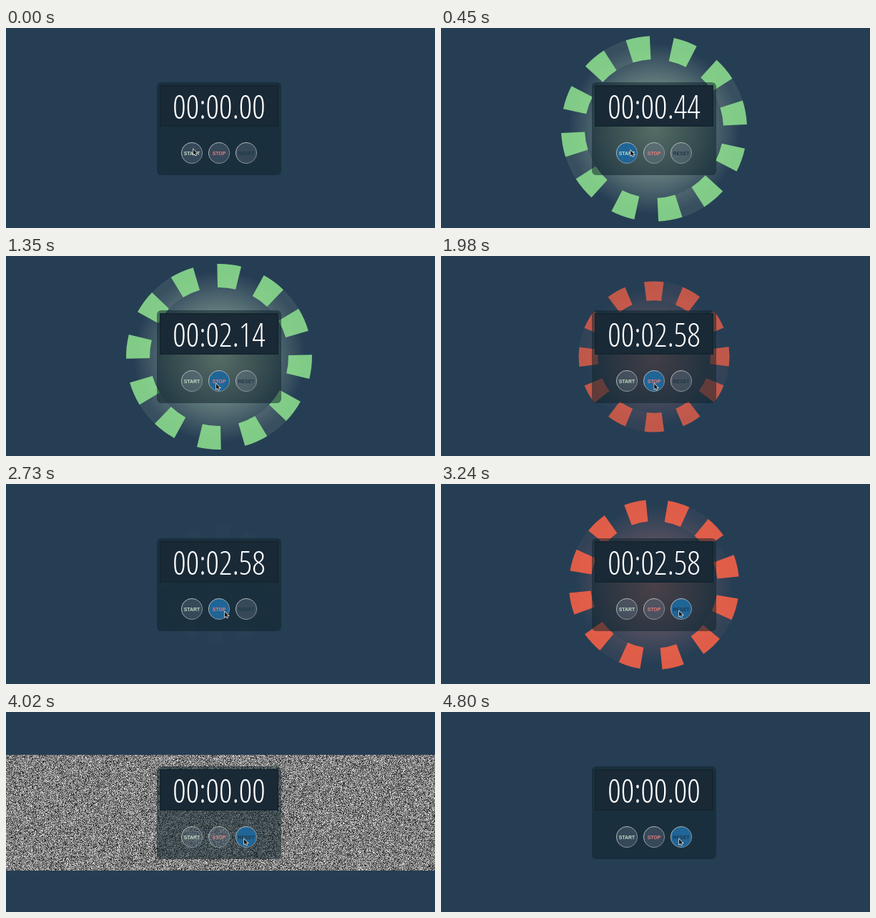
An HTML page with a canvas that plays this animation: 600x280 px, repeating every 4.83 s.

```html
<!DOCTYPE html>
<html lang="en">
<head>
<meta charset="utf-8">
<title>Stopwatch</title>
<style>
  html, body { margin: 0; height: 100%; overflow: hidden; background: #263e54; }
  canvas { display: block; }
</style>
</head>
<body>
<canvas id="stage" width="600" height="280"></canvas>
<script>
const ctx = document.getElementById('stage').getContext('2d');
const LOOP = 4830, STEP = 30, SECOND = 529.4; // one stopwatch second in ms of playback
const START = 217, STOP = 1583, RED = 1669, RESET = 3800;
const CX = 298, CY = 141, TAU = Math.PI * 2;

const pointerPath = [
  [0, 262, 170], [350, 262, 170], [780, 286, 181], [1350, 294, 179], [1700, 294, 179],
  [2400, 306, 179], [2730, 306, 179], [3200, 333, 178], [LOOP, 333, 178]
];
const buttons = [
  { label: 'START', x: 260, color: '#c0dcc2' },
  { label: 'STOP', x: 298, color: '#e67d7c' },
  { label: 'RESET', x: 336, color: '#1f3846' }
];
const pointerShape = new Path2D('M0 0V7.2L1.8 5.7L3 8.3L4.2 7.8L3 5.2H5.2Z');

const noise = document.createElement('canvas');
noise.width = 600;
noise.height = 210;
const noiseCtx = noise.getContext('2d');
const noiseData = noiseCtx.createImageData(600, 210);
const noisePixels = new Uint32Array(noiseData.data.buffer);

function pointerAt(t) {
  const i = pointerPath.findIndex(p => p[0] > t);
  const [t0, x0, y0] = pointerPath[i - 1], [t1, x1, y1] = pointerPath[i];
  const p = (t - t0) / (t1 - t0), k = p * p * (3 - 2 * p);
  return [x0 + (x1 - x0) * k, y0 + (y1 - y0) * k];
}

function drawWheel(t, scale, alpha, color, glow) {
  ctx.save();
  ctx.translate(CX, CY);
  ctx.rotate((t - START) / SECOND / 8 * TAU);
  ctx.scale(scale, scale);
  ctx.globalAlpha = alpha;
  const light = ctx.createRadialGradient(0, 0, 0, 0, 0, 120);
  light.addColorStop(0, `rgba(${glow},.8)`);
  light.addColorStop(1, `rgba(${glow},0)`);
  ctx.fillStyle = light;
  ctx.beginPath();
  ctx.arc(0, 0, 120, 0, TAU);
  ctx.fill();
  ctx.lineWidth = 33;
  const block = (angle, style) => {
    ctx.strokeStyle = style;
    ctx.beginPath();
    ctx.arc(0, 0, 113.5, angle - TAU / 48, angle + TAU / 48);
    ctx.stroke();
  };
  for (let i = 0; i < 12; i++) block(i * TAU / 12, color);
  for (let i = 0; i < 4; i++) block((i + .5) * TAU / 4, `rgba(${glow},.1)`);
  ctx.restore();
}

function drawNoise(t) {
  const half = 104 * (LOOP - STEP - t) / (LOOP - STEP - RESET);
  if (half <= 0) return;
  let seed = t * 7919 + 1;
  for (let i = 0; i < noisePixels.length; i++) {
    seed = (Math.imul(seed, 1664525) + 1013904223) >>> 0;
    const grey = ((seed >>> 24) + (seed >>> 16 & 255)) >> 1;
    noisePixels[i] = 0xff000000 | grey * 0x010101;
  }
  noiseCtx.putImageData(noiseData, 0, 0);
  const height = Math.round(half * 2);
  ctx.drawImage(noise, 0, 0, 600, height, 0, Math.round(CY - half), 600, height);
}

function drawPanel(time) {
  ctx.fillStyle = 'rgba(15,35,42,.53)';
  ctx.beginPath();
  ctx.roundRect(211, 76, 174, 130, 6);
  ctx.fill();
  ctx.fillStyle = '#1a2936';
  ctx.fillRect(215, 80, 166, 58);
  ctx.strokeStyle = '#14262f';
  ctx.lineWidth = 2;
  ctx.strokeRect(216, 81, 164, 56);

  ctx.fillStyle = '#fff';
  ctx.textAlign = 'center';
  ctx.font = '300 condensed 46px "Open Sans Condensed Light", "Open Sans", sans-serif';
  ctx.fillText('00:' + time.toFixed(2).padStart(5, '0'), CX, 126.5);
}

function drawButton({ label, x, color }, hovered) {
  const rim = ctx.createLinearGradient(x - 11, 164, x + 11, 186);
  rim.addColorStop(0, '#b9bebd');
  rim.addColorStop(1, '#7b858b');
  ctx.fillStyle = hovered ? '#206597' : 'rgba(130,145,165,.28)';
  ctx.strokeStyle = rim;
  ctx.lineWidth = 1;
  ctx.beginPath();
  ctx.arc(x, 175, 14.6, 0, TAU);
  ctx.fill();
  ctx.stroke();
  ctx.fillStyle = color;
  ctx.font = 'bold 6.9px "Liberation Sans", Arial, sans-serif';
  ctx.fillText(label, x, 177.5);
}

function drawPointer(x, y) {
  ctx.save();
  ctx.translate(x, y);
  ctx.fillStyle = '#111';
  ctx.strokeStyle = '#e8e8e8';
  ctx.lineWidth = 1.4;
  ctx.stroke(pointerShape);
  ctx.fill(pointerShape);
  ctx.restore();
}

function draw(t) {
  ctx.fillStyle = '#263e54';
  ctx.fillRect(0, 0, 600, 280);

  if (t >= START && t < 1650) {
    drawWheel(t, 1, Math.min(1, (t - START) / 150), 'rgba(144,226,144,.86)', '200,225,190');
  } else if (t >= RED && t < RESET) {
    const p = (t - RED) / (2 * SECOND) % 1;
    const fade = Math.sin(Math.PI * p) ** .8;
    drawWheel(t, .65 + .55 * p, fade, 'rgba(255,99,71,.85)', '170,110,115');
  }
  if (t >= RESET) drawNoise(t);

  const running = Math.max(0, Math.min(2.58, (t - START) / SECOND));
  drawPanel(t < STOP ? running : t < RESET ? 2.58 : 0);

  const [px, py] = pointerAt(t);
  for (const b of buttons) drawButton(b, t >= STEP && Math.hypot(px - b.x, py - 175) < 15);
  drawPointer(px, py);
}

const begin = performance.now();
function tick() {
  const t = (performance.now() - begin) % LOOP;
  draw(Math.floor(t / STEP) * STEP);
  requestAnimationFrame(tick);
}
tick();
</script>
</body>
</html>
```
